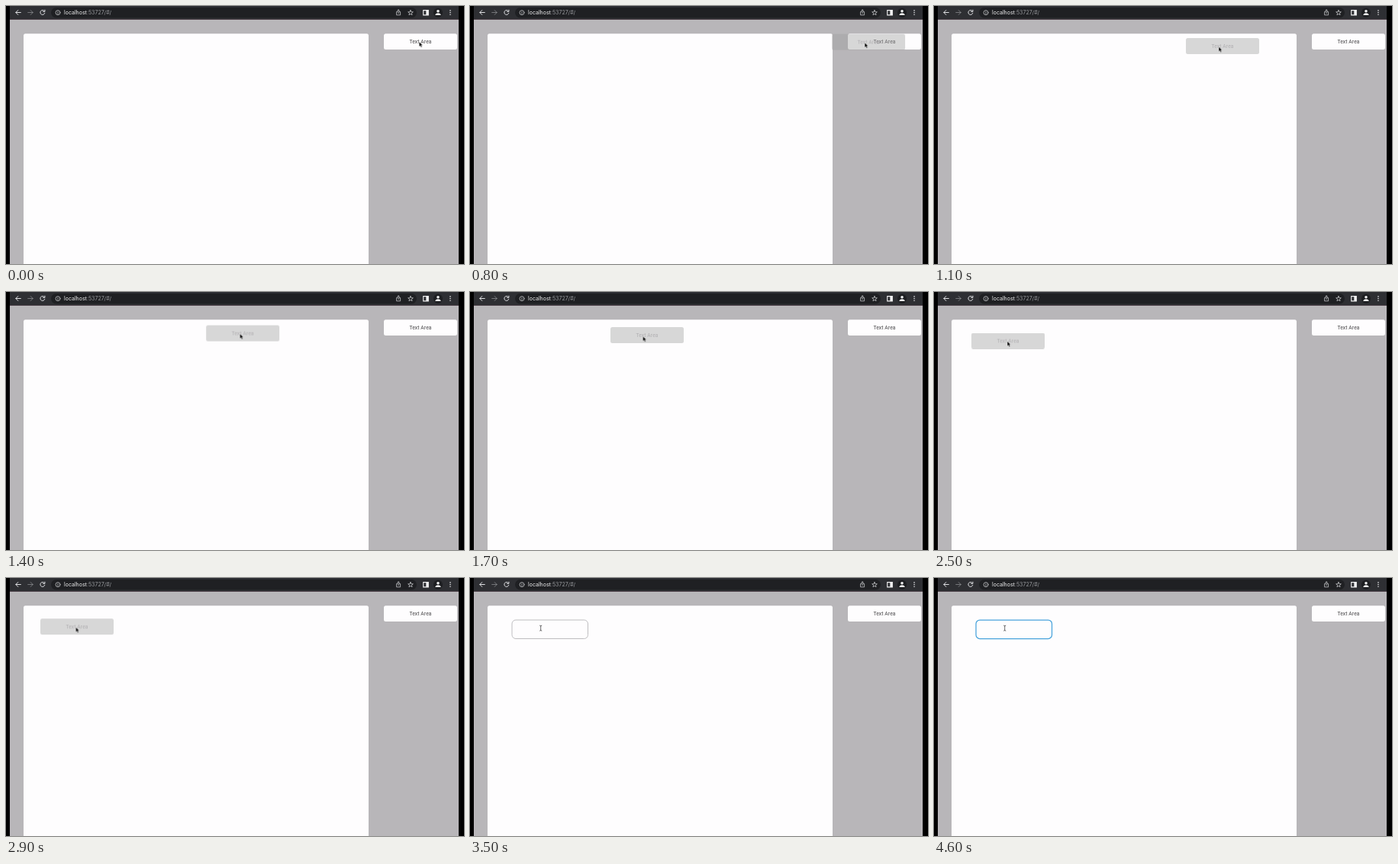
Write an HTML page that moves like this. It is 600x338 px and loops after 5 s.

```html
<!DOCTYPE html>
<html lang="en">
<head>
<meta charset="utf-8">
<title>Drag a text area</title>
<style>
  html, body { margin: 0; width: 100%; height: 100%; overflow: hidden; background: #000; }
  svg { display: block; width: 100%; height: 100%; }
  .icon { fill: none; stroke: #dfe0e3; stroke-linecap: round; stroke-linejoin: round; }
  .fine { stroke: #c3c4c7; stroke-width: .8; }
  .url { font: 7px Inter, "Liberation Sans", sans-serif; fill: #999b9f; }
  .label { font: 6.7px Roboto, sans-serif; letter-spacing: .12px; text-anchor: middle; fill: #464547; }
  #ghost .label { fill: #b0afb1; }
  #ghost, #field, #ibeam, #caret { opacity: 0; }
</style>
</head>
<body>
<svg viewBox="0 0 600 338">
  <rect width="600" height="338" fill="#000"/>
  <rect x="5" width="588" height="338" fill="#b8b6b9"/>

  <g id="toolbar">
    <rect x="5" width="588" height="18" fill="#4a3e46"/>
    <rect x="5" width="588" height="17" fill="#2e2f33"/>
    <rect x="59" y="2" width="479" height="13.4" rx="6.7" fill="#1f2023"/>
    <path id="back" class="icon" d="M19.3 8.5H13M15.8 5.5L12.8 8.5L15.8 11.5"/>
    <path class="icon" stroke-opacity=".4" d="M28.7 8.5H35M32.2 5.5L35.2 8.5L32.2 11.5"/>
    <path class="icon" d="M50.2 6.5A3 3 0 1 0 50.8 9.3M50.9 5.2V7.4H48.6"/>
    <circle class="icon fine" cx="68" cy="8.7" r="3"/>
    <path class="icon fine" d="M68 8.5V10.2M68 7.1V7.2"/>
    <text class="url" x="76" y="11.2"><tspan fill="#f0f0f1">localhost</tspan>:53727/#/</text>
    <path class="icon fine" d="M512.9 7.6H511.6V11.8H516.6V7.6H515.3M514.1 9.6V5M512.6 6.3L514.1 4.8L515.6 6.3"/>
    <path class="icon fine" id="star"/>
    <path d="M546.7 5.6h6.6v6.3h-6.6z" fill="none" stroke="#f1f1f2" stroke-width="1.1"/>
    <path d="M550.3 5.6h3v6.3h-3z" fill="#f1f1f2"/>
    <circle cx="566" cy="8.7" r="6" fill="#1d1e21"/>
    <circle cx="566" cy="6.8" r="1.8" fill="#f1f1f2"/>
    <path d="M562.4 12V11.2Q563.2 9.3 566 9.3T569.6 11.2V12Z" fill="#f1f1f2"/>
    <path class="icon" stroke-width="1.6" stroke-dasharray="0 2.7" d="M582 5.9V11.4"/>
  </g>

  <rect x="23" y="36.2" width="452" height="310" rx="2.5" fill="#fefdfe"/>
  <rect x="495" y="36.2" width="96" height="20.9" rx="2.5" fill="#fefdfe"/>
  <text class="label" x="543" y="49.1">Text Area</text>

  <g id="ghost">
    <rect width="96" height="21" rx="2.5" fill="#9e9e9e" fill-opacity=".4"/>
    <text class="label" x="48" y="13">Text Area</text>
  </g>

  <rect id="field" x="55" y="55" width="99.5" height="24.5" rx="5" fill="#fefdfe"/>
  <rect id="caret" x="60.5" y="61" width="1" height="11" fill="#3a97d6"/>

  <path id="arrow" d="M0 0V6.2L1.5 4.9L2.6 7.3L3.7 6.8L2.7 4.5H4.6Z" fill="#050505" stroke="#fff" stroke-width=".5" stroke-opacity=".8"/>
  <path id="ibeam" d="M91.2 62.2Q92.7 62.2 92.7 63.2Q92.7 62.2 94.2 62.2M92.7 63V68.4M91.2 69.2Q92.7 69.2 92.7 68.2Q92.7 69.2 94.2 69.2" fill="none" stroke="#444446" stroke-width=".8"/>
</svg>
<script>
const LOOP = 5000;
const TICK = 100;
const DRAG = { start: 700, end: 2900, drop: 3300 };
const GRIP = { x: 46.5, y: 11.3 };
const LEAD = 0.1; // the pointer runs slightly ahead of the ghost

// Key points of the dragged ghost.
const path = [
  { t: 700, x: 493, y: 36 },
  { t: 1100, x: 330, y: 42 },
  { t: 1300, x: 285, y: 44 },
  { t: 1700, x: 184, y: 46 },
  { t: 1900, x: 73, y: 80 },
  { t: 2100, x: 9.5, y: 72 },
  { t: 2500, x: 49, y: 53.5 },
  { t: 2900, x: 45, y: 53.2 }
];

const find = id => document.getElementById(id);
const move = (x, y) => ({ transform: `translate(${x}px, ${y}px)` });

// Slope at a key point, at rest on both ends.
function slope(i, axis) {
  const before = path[i - 1], after = path[i + 1];
  return before && after ? (after[axis] - before[axis]) / (after.t - before.t) : 0;
}

// Smooth cubic through the key points.
function along(axis, time) {
  const t = Math.min(Math.max(time, DRAG.start), DRAG.end);
  const i = Math.max(0, path.findIndex(p => p.t >= t) - 1);
  const a = path[i], b = path[i + 1];
  const span = b.t - a.t;
  const s = (t - a.t) / span, r = 1 - s;
  return a[axis] * r * r * (1 + 2 * s) + b[axis] * s * s * (1 + 2 * r)
    + span * s * r * (r * slope(i, axis) - s * slope(i + 1, axis));
}

function pointer(axis, t) {
  const step = along(axis, t + TICK / 2) - along(axis, t - TICK / 2);
  return along(axis, t) + GRIP[axis] + LEAD * step;
}

// Plays [ms, style] steps over the loop, as hard changes unless eased.
function play(id, steps) {
  const frames = steps.map(([ms, style]) => ({ easing: "step-end", ...style, offset: ms / LOOP }));
  frames.push({ ...steps[steps.length - 1][1], offset: 1 });
  find(id).animate(frames, { duration: LOOP, iterations: Infinity });
}

function show(id, from, to) {
  const steps = [[from, { opacity: 1 }]];
  if (from > 0) steps.unshift([0, { opacity: 0 }]);
  if (to < LOOP) steps.push([to, { opacity: 0 }]);
  play(id, steps);
}

function dragged(id, position, rest) {
  const steps = [[0, rest]];
  for (let t = DRAG.start; t <= DRAG.end; t += TICK) {
    steps.push([t, move(position("x", t), position("y", t))]);
  }
  play(id, steps);
}

function starPath(cx, cy, outer, inner) {
  const points = Array.from({ length: 10 }, (_, i) => {
    const radius = i % 2 ? inner : outer;
    const angle = i * Math.PI / 5;
    return `${cx + radius * Math.sin(angle)} ${cy - radius * Math.cos(angle)}`;
  });
  return `M${points.join("L")}Z`;
}

find("star").setAttribute("d", starPath(530, 8.9, 3.5, 1.5));

dragged("ghost", along, move(495, 36));
dragged("arrow", pointer, move(541.3, 47));

const idle = { stroke: "#bebdc0", strokeWidth: "1px" };
const focused = { stroke: "#48a3dc", strokeWidth: "1.25px" };
play("field", [[0, idle], [4100, { ...idle, easing: "steps(3, start)" }], [4400, focused]]);

show("ghost", DRAG.start, DRAG.drop);
show("field", DRAG.drop, LOOP);
show("arrow", 0, 3500);
show("ibeam", 3500, LOOP);
show("caret", 4100, 4600);
</script>
</body>
</html>
```
